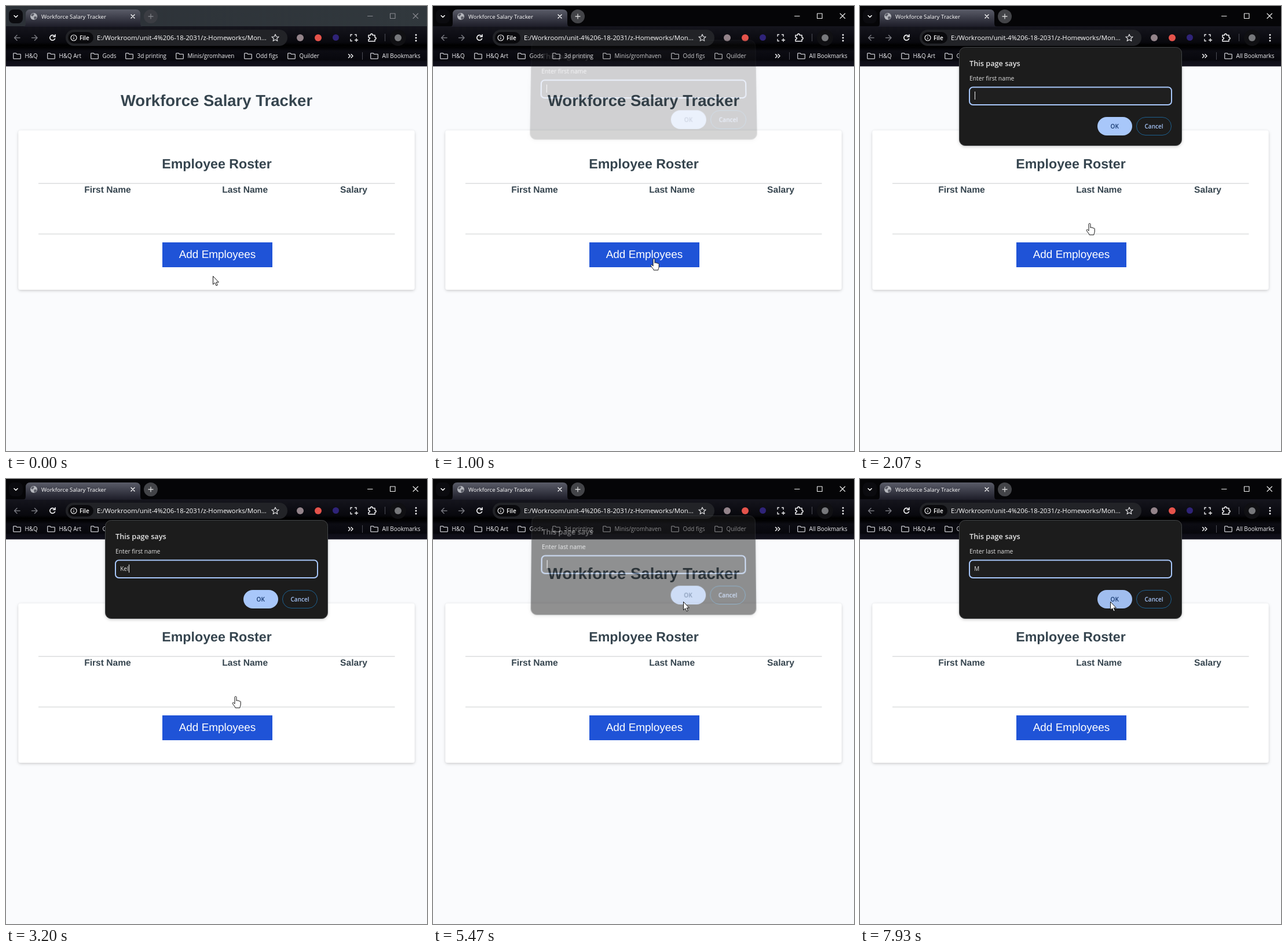
An HTML page for the animation above (8000 ms loop, 727x770 px).

```html
<!DOCTYPE html>
<html lang="en">
<head>
<meta charset="utf-8">
<title>Workforce Salary Tracker</title>
<style>
html, body { margin: 0; width: 100%; height: 100%; overflow: hidden; background: #fafbfd; }
svg { position: absolute; left: 0; top: 0; width: 727px; height: 770px; display: block; }
text { white-space: pre; }
.ui { font-family: "Open Sans", "Noto Sans", sans-serif; }
.page { font-family: "Liberation Sans", Arial, sans-serif; font-weight: bold; fill: #36454f; text-anchor: middle; text-rendering: geometricPrecision; }
.semi { font-weight: 600; }
.mid { text-anchor: middle; }
.line { fill: none; stroke-linecap: round; stroke-linejoin: round; }
#dialog { transform-origin: 363.5px 156px; }
</style>
</head>
<body>
<svg id="stage" viewBox="0 0 727 770">
  <defs>
    <linearGradient id="idle" x1="0" y1="0" x2="1" y2="0">
      <stop offset="0" stop-color="#2c3137"/><stop offset="1" stop-color="#31383d"/>
    </linearGradient>
    <linearGradient id="tab" x1="0" y1="0" x2="0" y2="1">
      <stop offset="0" stop-color="#5a5c68"/><stop offset=".5" stop-color="#3b3c48"/><stop offset="1" stop-color="#1d1d28"/>
    </linearGradient>
    <linearGradient id="bar" x1="0" y1="0" x2="0" y2="1">
      <stop offset="0" stop-color="#15151d"/><stop offset=".4" stop-color="#08080d"/><stop offset=".47" stop-color="#000"/>
      <stop offset=".54" stop-color="#020204"/><stop offset=".62" stop-color="#0c0c13"/><stop offset=".84" stop-color="#07070c"/>
      <stop offset=".88" stop-color="#0e0e17"/><stop offset="1" stop-color="#12111c"/>
    </linearGradient>
    <filter id="soft" x="-5%" y="-8%" width="110%" height="118%">
      <feDropShadow dx="0" dy="1.5" stdDeviation="2.5" flood-color="#000" flood-opacity=".2"/>
    </filter>
  </defs>

  <rect width="727" height="770" fill="#fafbfd"/>
  <rect id="strip" width="727" height="36"/>
  <rect y="35" width="727" height="69.500" fill="url(#bar)"/>

  <g class="ui" id="chrome">
    <rect x="5" y="6" width="24" height="24" rx="8" fill="#0b0b0f"/>
    <path class="line" d="M14 16.5l3 3 3-3" stroke="#fff" stroke-width="1.6"/>
    <path d="M29 36q5 0 5-6V14q0-8 8-8h182q8 0 8 8v16q0 6 5 6z" fill="url(#tab)"/>
    <circle cx="48" cy="18" r="6" fill="#b4b6bc"/>
    <path d="M43 16q3-4 5-3 1 3-1 3.500-1 3-4-.5zM48 19q3-2 5 0-1 4-4 4.500z" fill="#5b5d67"/>
    <text x="61" y="22" font-size="9.7" fill="#fff">Workforce Salary Tracker</text>
    <path class="line" d="M216 15l6 6m0-6l-6 6" stroke="#fff" stroke-width="1.4"/>
    <circle id="plusBg" cx="250" cy="18" r="12"/>
    <g id="controls" class="line" stroke-width="1.1">
      <path d="M246 18h8m-4-4v8" stroke-width="1.3" opacity=".85"/>
      <path d="M624.500 17.500h8.500"/>
      <path d="M663.500 13h8.500v8.500h-8.500z"/>
      <path d="M703 13l8.500 8.500m0-8.500l-8.500 8.500"/>
    </g>

    <g class="line" stroke-width="1.5">
      <path d="M24 55h-9.500m4.500-4.500L14.500 55l4.500 4.500M44.500 55H54m-4.500-4.500L54 55l-4.500 4.500" stroke="#77787f"/>
      <path d="M84.500 56.500a4.500 4.500 0 1 1-1-4.800l1.200 1.200m.3-3.400v3.700h-3.700" stroke="#f4f4f6" stroke-width="1.6"/>
    </g>
    <rect x="103" y="41" width="383" height="28" rx="14" fill="#222327"/>
    <rect x="107" y="45" width="44" height="20" rx="10" fill="#0a0a0d"/>
    <circle cx="117" cy="55" r="5" fill="none" stroke="#f0f0f2" stroke-width="1.2"/>
    <path d="M117 54.500v3M117 52v1.200" stroke="#f0f0f2" stroke-width="1.2"/>
    <text class="semi" x="127" y="58.500" font-size="10" fill="#fff">File</text>
    <text x="157" y="59" font-size="11.3" fill="#fff">E:/Workroom/unit-4%206-18-2031/z-Homeworks/Mon...</text>
    <path class="line" d="M465 49l1.800 4 4.300.4-3.300 2.900 1 4.300-3.800-2.300-3.800 2.300 1-4.300-3.300-2.900 4.300-.4z" stroke="#e2e2e5" stroke-width="1.200"/>
    <circle cx="508" cy="55" r="6" fill="#93838a"/>
    <circle cx="539" cy="55" r="6" fill="#e5534b"/>
    <circle cx="569.500" cy="54.500" r="5.500" fill="#2f2378"/>
    <path d="M595 53v-3.500h3M602 49.500h3V53M595 57v3.500h3M605 56v6M602 59h6" fill="none" stroke="#f0f0f2" stroke-width="1.300"/>
    <path class="line" d="M626 50.500h3.500q0-2.500 1.800-2.500t1.800 2.500h3.900v3.800q2 0 2 1.700t-2 1.700v3.300h-11v-3.300q2.300 0 2.300-1.700t-2.300-1.700z" stroke="#f4f4f6" stroke-width="1.500"/>
    <path d="M654.500 48v13M615.500 80v13" stroke="#4b4c55"/>
    <circle cx="677" cy="55" r="14" fill="#101013"/>
    <circle cx="677" cy="55" r="6" fill="#77787b"/>
    <g fill="#f4f4f6"><circle cx="708" cy="50" r="1.500"/><circle cx="708" cy="55" r="1.500"/><circle cx="708" cy="60" r="1.500"/></g>
    <path class="line" d="M591.500 83.500l3 3-3 3m4.500-6l3 3-3 3" stroke="#f4f4f6" stroke-width="1.500"/>
    <g id="marks" font-size="9.9" fill="#f0f0f3"></g>
  </g>

  <g class="page">
    <text x="363.5" y="173" font-size="27.5">Workforce Salary Tracker</text>
    <rect x="21.500" y="215.500" width="684" height="275.500" rx="4" fill="#fff" filter="url(#soft)"/>
    <text x="364" y="280.500" font-size="23.2">Employee Roster</text>
    <path d="M56 307h615.500M56 394.500h615.500" stroke="#e4e5e6" stroke-width="2"/>
    <g font-size="15.600">
      <text x="175.500" y="322.500">First Name</text>
      <text x="412.700" y="322.500">Last Name</text>
      <text x="600.500" y="322.500">Salary</text>
    </g>
    <rect x="270" y="409" width="190" height="43" fill="#1f53d7"/>
    <text x="365" y="436" font-size="18.950" font-weight="normal" style="fill:#fff">Add Employees</text>
  </g>
</svg>

<svg id="dialog" class="ui" viewBox="0 0 727 770">
  <rect x="171.500" y="71.500" width="384" height="170" rx="10" fill="#1f1f1f" stroke="#434446" filter="url(#soft)"/>
  <text class="semi" x="189" y="104" font-size="12.700" fill="#e6e6e6">This page says</text>
  <text id="ask" x="189" y="129" font-size="10.300" fill="#e3e3e3"></text>
  <rect x="189" y="140.500" width="349" height="30.500" rx="6" fill="#1f1f1f" stroke="#a8c7fa" stroke-width="2"/>
  <text id="typed" x="197.300" y="159" font-size="9.900" fill="#e6e6e6"></text>
  <rect id="caret" y="148" width="1" height="14" fill="#f0f0f0"/>
  <rect id="ok" x="410" y="192" width="60" height="32" rx="16"/>
  <rect x="477.500" y="192.500" width="60" height="31" rx="15.500" fill="none" stroke="#1d5f8e"/>
  <g class="semi mid" font-size="10">
    <text x="439.700" y="212" fill="#14376f">OK</text>
    <text x="507.500" y="212" fill="#a8c7fa">Cancel</text>
  </g>
</svg>

<svg viewBox="0 0 727 770">
  <path id="hand" d="M4.500 2.200c0-2 3-2 3 0v6c.5-1.300 2.500-1 2.600.4.600-1.100 2.300-.7 2.400.7.800-.9 2.200-.4 2.200 1v4.200c0 3-1.400 3.800-1.400 6H5.600c0-2-4.400-5.800-4.900-7.600-.4-1.500 1.400-2.200 2.400-.9l1.400 1.600z" fill="#fff" stroke="#111" stroke-linejoin="round"/>
  <path id="arrow" d="M.5.5v14.300l3.200-3 2.300 5.100 2.300-1-2.300-4.900h4.400z" fill="#fff" stroke="#111" stroke-linejoin="round"/>
</svg>

<script>
const LOOP = 8000, ACTIVE = 870, OPEN = 971, CLOSE = 5310, REOPEN = 5395, BLINK = 530;
const $ = id => document.getElementById(id);
const clamp = v => Math.max(0, Math.min(1, v));

const folders = [[12, "H&amp;Q"], [71, "H&amp;Q Art"], [146, "Gods"], [206, "3d printing"],
  [293, "Minis/gromhaven"], [411, "Odd figs"], [486, "Quilder"], [629, "All Bookmarks"]];
$("marks").innerHTML = folders.map(([x, name]) =>
  `<path class="line" transform="translate(${x} 81)" d="M.7 1.500q0-.8.800-.8h3.700l1.500 1.700h5.800q.8 0 .8.800v6.300q0 .8-.8.800h-11q-.8 0-.8-.8z" stroke="#c9c9ce" stroke-width="1.300"/>` +
  `<text x="${x + 20.500}" y="90">${name}</text>`).join("");

// pointer hot spot: [time, x, y]
const path = [[0, 357, 467], [40, 357, 467], [70, 322, 545], [130, 272, 566], [200, 290, 520], [270, 345, 455],
  [325, 397, 413], [525, 397, 413], [530, 397, 415], [640, 397, 415], [670, 388, 427], [730, 381, 437],
  [1270, 381, 437], [1400, 385, 412], [1600, 396, 375], [1720, 396, 375], [1730, 396, 376],
  [4440, 396, 376], [4530, 412, 397], [4600, 440, 392], [4670, 478, 374], [4800, 515, 349], [4870, 520, 338],
  [4950, 510, 312], [5050, 474, 262], [5150, 442, 226], [5260, 432, 212], [LOOP, 432, 212]];

// key presses: [time, text in the field]
const keys = [[0, ""], [2865, "K"], [3065, "Ke"], [3195, "Kel"], [3925, "Kelo"], [3995, "Kelov"], [REOPEN, ""], [7395, "M"]];
const blinks = [995, 2865, 3135, 3935, REOPEN, 7395];

const last = (list, t, at) => list.filter(e => at(e) <= t).pop();

function pointer(t) {
  const i = path.findIndex(p => p[0] > t), [t0, x0, y0] = path[i - 1], [t1, x1, y1] = path[i];
  const k = (t - t0) / (t1 - t0);
  return [x0 + (x1 - x0) * k, y0 + (y1 - y0) * k];
}

function drawWindow(t) {
  const on = t >= ACTIVE;
  $("strip").setAttribute("fill", on ? "#050507" : "url(#idle)");
  $("plusBg").setAttribute("fill", on ? "#434448" : "#3b3d43");
  $("controls").setAttribute("stroke", on ? "#f2f2f2" : "#8b8c92");
}

function drawDialog(t, x, y) {
  const start = t < REOPEN ? OPEN : REOPEN;
  const shown = t >= CLOSE && t < REOPEN ? 1 - clamp((t - CLOSE) / 80) : clamp((t - start) / 155);
  const away = 1 - shown, box = $("dialog").style;
  box.opacity = shown;
  box.transform = away ? `translateY(${-15 * away}px) perspective(1000px) rotateX(${6 * away}deg) scale(${1 + .016 * away})` : "none";
  $("ask").textContent = t < REOPEN ? "Enter first name" : "Enter last name";

  const text = last(keys, t, k => k[0])[1], typed = $("typed");
  typed.textContent = text;
  $("caret").setAttribute("x", Math.round(198 + (text ? typed.getComputedTextLength() - .5 : 0)));
  const reset = last(blinks, t, b => b) || 0;
  $("caret").style.opacity = Math.floor((t - reset) / BLINK) % 2 ? 0 : 1;
  const hover = x > 410 && x < 470 && y > 192 && y < 224;
  $("ok").setAttribute("fill", hover ? "#a0bdee" : "#a8c7fa");
}

function drawPointer(t, x, y) {
  const hand = t >= 300 && y > 242;
  $("hand").style.display = hand ? "" : "none";
  $("arrow").style.display = hand ? "none" : "";
  $("hand").setAttribute("transform", `translate(${x - 5.5} ${y - .5})`);
  $("arrow").setAttribute("transform", `translate(${x} ${y})`);
}

function draw(t) {
  const [x, y] = pointer(t);
  drawWindow(t);
  drawDialog(t, x, y);
  drawPointer(t, x, y);
}

const begin = performance.now();
function tick(now) {
  draw(Math.max(0, now - begin) % LOOP);
  requestAnimationFrame(tick);
}
draw(0);
requestAnimationFrame(tick);
</script>
</body>
</html>
```
